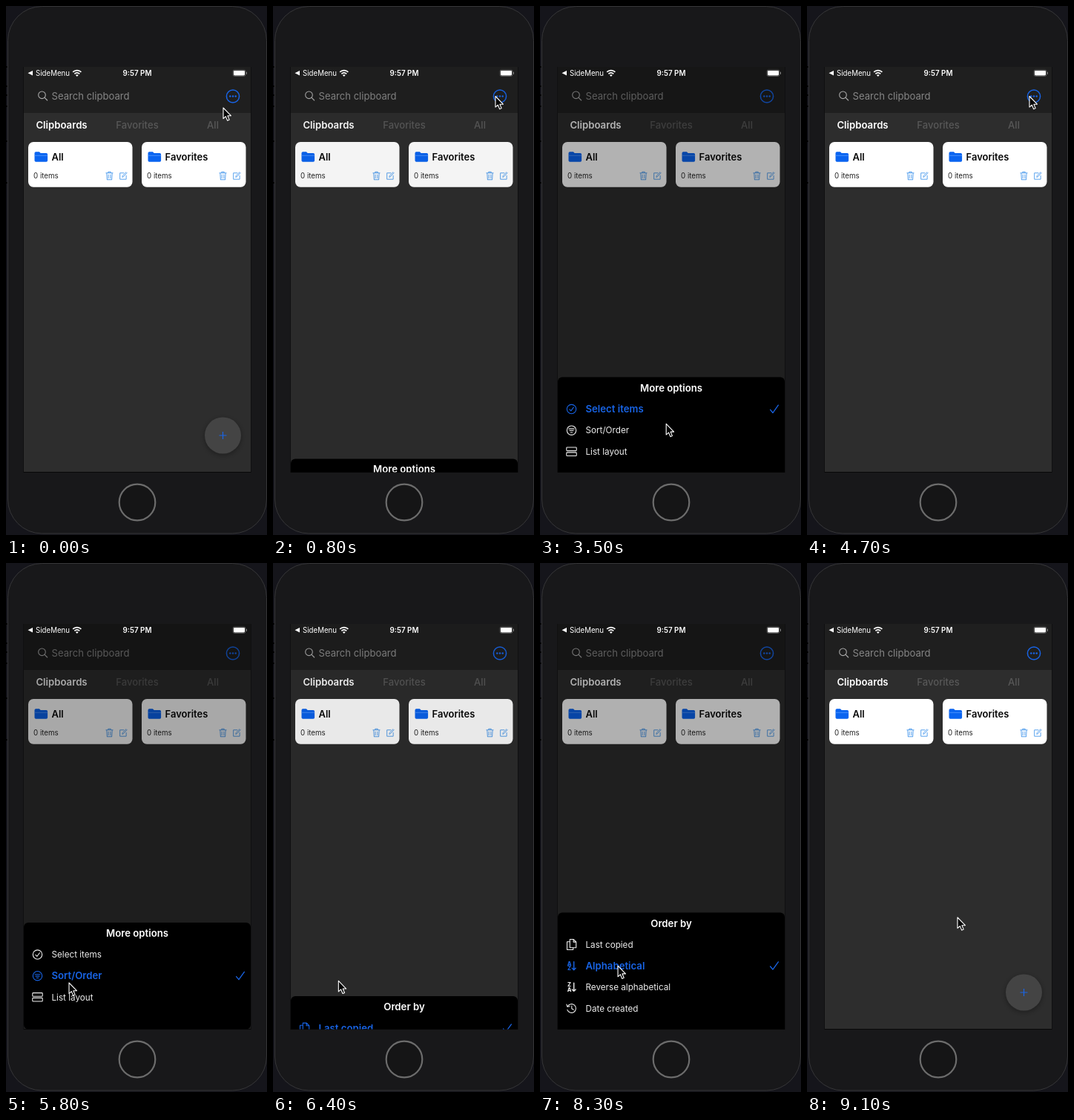
Animation, 352 px wide and 712 px high, one loop 9200 ms. Source, as an HTML page:

```html
<!DOCTYPE html>
<html lang="en">
<head>
<meta charset="utf-8">
<title>Clipboard menu</title>
<style>
html, body { margin: 0; width: 100%; height: 100%; overflow: hidden; background: #15151b; }
svg { display: block; width: 352px; height: 712px; }
text { font-family: Inter, "Open Sans", sans-serif; }
.ico { fill: none; stroke: currentColor; stroke-width: 1.1; stroke-linecap: round; stroke-linejoin: round; }
</style>
</head>
<body>
<svg id="stage" viewBox="0 0 352 712" xmlns="http://www.w3.org/2000/svg"></svg>
<script>
const LOOP = 9200, STEP = 100;
const BLUE = '#1864e6', BOTTOM = 627.5, ROW = 28.6;
const stage = document.getElementById('stage');

const label = (x, y, size, str, { fill = '#fff', weight = 400, anchor = 'start' } = {}) =>
  `<text x="${x}" y="${y + size * 0.36}" font-size="${size}" font-weight="${weight}" fill="${fill}" text-anchor="${anchor}">${str}</text>`;
const at = (x, y, body, color, scale = 1) =>
  `<g class="ico" transform="translate(${x} ${y}) scale(${scale})" color="${color}">${body}</g>`;
const letter = (y, ch) =>
  `<text x="-3" y="${y}" font-size="7.4" font-weight="800" text-anchor="middle" fill="currentColor" stroke="none">${ch}</text>`;
const sorted = (a, b) =>
  letter(-0.6, a) + letter(6.2, b) + '<path d="M3.2-5.5V5.5M.8 3.2 3.2 5.6 5.6 3.2" stroke-width="1.4"/>';

const icons = {
  select: '<circle r="6.2"/><path d="M-2.6.3-.7 2.4 2.8-2.4"/>',
  sort: '<circle r="6.2"/><path d="M-3.5-2H3.5M-2.5.4H2.5M-1.3 2.8H1.3"/>',
  list: '<rect x="-6.7" y="-5.7" width="13.4" height="4.6" rx=".8"/><rect x="-6.7" y="1.1" width="13.4" height="4.6" rx=".8"/>',
  copied: '<path d="M-2.2-3.8H-6V7H2.2V4.3M-2.2 4.3V-7H2.8L6.2-3.6V4.3ZM2.6-6.8V-3.4H6"/>',
  az: sorted('A', 'Z'),
  za: sorted('Z', 'A'),
  date: '<path d="M-5.2-2.6A5.9 5.9 0 1 1-5.6 2M-6.6-5.2-5.6-2-2.3-2.6M.3-3.3V.4L2.7 2"/>',
  check: '<path d="M-5.4.9-2 5 5.4-5.3" stroke-width="1.3"/>',
  trash: '<path d="M-5-4H5M-1.8-4V-5.8H1.8V-4M-4-4-3.4 5.8H3.4L4-4M-1.5-1.7V3.6M1.5-1.7V3.6"/>',
  edit: '<path d="M1-4.4H-4.8V5H4.6V-.4M-1.2 1.5-.8-.4 4.5-5.6 5.6-4.5.6.9Z"/>'
};

const card = (x, name) => `
  <g transform="translate(${x} 183)">
    <rect width="140.5" height="60.8" rx="7" fill="#fff"/>
    <path d="M8.5 25V15q0-1.8 1.8-1.8h4.6l1.8 1.8h7.6q1.8 0 1.8 1.8V25q0 1.8-1.8 1.8h-14Q8.5 26.8 8.5 25Z" fill="#0a64f0"/>
    <path d="M8.5 18.3h17.6" stroke="#5a9cff" stroke-width=".8"/>
    ${label(31.5, 20, 13, name, { fill: '#080808', weight: 600 })}
    ${label(7, 45.6, 9.75, '0 items', { fill: '#222' })}
    ${at(109.5, 45.5, icons.trash, '#5aa2ee', 0.92)}
    ${at(128, 45.7, icons.edit, '#5aa2ee', 0.9)}
  </g>`;

function makeSheet(id, title, items, runs) {
  const height = 60 + 27.8 * items.length;
  const rows = items.map(([icon, name], i) => {
    const y = 43 + ROW * i;
    return `<g class="off">${at(42.5, y, icons[icon], '#eee')}${label(61.5, y, 11.7, name, { fill: '#eee' })}</g>
      <g class="on">${at(42.5, y, icons[icon], BLUE)}${label(61.5, y, 13.2, name, { fill: BLUE, weight: 600 })}
      ${at(316, y, icons.check, BLUE)}</g>`;
  }).join('');
  const svg = `<g id="${id}"><rect x="24" width="306" height="${height}" rx="6" fill="#000"/>
    ${label(177, 14.3, 13.2, title, { weight: 600, anchor: 'middle' })}${rows}</g>`;
  return { id, height, svg, runs };
}

// Each run opens, may be dragged down by the pointer, then closes.
const more = makeSheet('more', 'More options',
  [['select', 'Select items'], ['sort', 'Sort/Order'], ['list', 'List layout']],
  [{ open: 700, grab: 3340, close: 3940 }, { open: 4800, close: 5900 }]);
const order = makeSheet('order', 'Order by',
  [['copied', 'Last copied'], ['az', 'Alphabetical'], ['za', 'Reverse alphabetical'], ['date', 'Date created']],
  [{ open: 6250, grab: 8200, close: 8600 }]);

const phone = `
  <rect width="352" height="712" fill="#15151b"/>
  <path d="M0 82H3M0 108H3M0 120H3M0 135H3M0 182H3M0 238H3" stroke="#050505" stroke-width="2"/>
  <rect x="2.5" y=".5" width="349" height="709.5" rx="46" fill="#18181a" stroke="#363638"/>
  <circle cx="177" cy="668" r="24.3" fill="#151516" stroke="#6c6c6c" stroke-width="2.2"/>
  <rect x="23.5" y="82" width="307" height="546" fill="#080808"/>`;

const home = `
  <rect x="24" y="82" width="306" height="545" fill="#2d2d2d"/>
  <rect x="24" y="82" width="306" height="62" fill="#1f1f1f"/>
  ${at(49.5, 121, '<circle cx="-1" cy="-1.2" r="4.8"/><path d="M2.6 2.4 6.2 6"/>', '#aaa')}
  ${label(61.5, 121.3, 13.1, 'Search clipboard', { fill: '#868686' })}
  <circle cx="306" cy="121.5" r="8.6" fill="none" stroke="${BLUE}" stroke-width="1.5"/>
  ${[-3.7, 0, 3.7].map(d => `<circle cx="${306 + d}" cy="121.5" r="1.25" fill="${BLUE}"/>`).join('')}
  ${label(75, 160.5, 13.2, 'Clipboards', { weight: 600, anchor: 'middle' })}
  ${label(177, 160.5, 13.1, 'Favorites', { fill: '#585858', weight: 500, anchor: 'middle' })}
  ${label(279, 160.5, 13.1, 'All', { fill: '#585858', weight: 500, anchor: 'middle' })}
  ${card(30, 'All')}${card(183, 'Favorites')}
  <g id="add">
    <circle cx="292.5" cy="580" r="26" fill="#000" opacity=".22" filter="url(#soft)"/>
    <circle cx="292.5" cy="578" r="24.5" fill="#444"/>
    <path d="M287.5 578h10M292.5 573v10" stroke="${BLUE}" stroke-width="1.2"/>
  </g>`;

const status = `
  <path d="M29.5 90.3 36 87V93.6Z" fill="#fff"/>
  ${label(40, 90.3, 9.7, 'SideMenu')}
  <path d="M90.2 88.9a8 8 0 0 1 11.2 0M92.4 91.3a4.8 4.8 0 0 1 6.8 0" fill="none" stroke="#fff" stroke-width="1.7"/>
  <path d="M95.8 95 93.9 93.1a2.7 2.7 0 0 1 3.8 0Z" fill="#fff"/>
  ${label(177, 90.3, 9.8, '9:57 PM', { weight: 600, anchor: 'middle' })}
  <rect x="306" y="86" width="17" height="8.4" rx="2.3" fill="none" stroke="#777" stroke-width=".7"/>
  <rect x="307" y="87" width="15" height="6.4" rx="1.3" fill="#fff"/>
  <path d="M324.4 88.8v3" stroke="#888"/>`;

stage.innerHTML = `
  <defs>
    <clipPath id="screen"><rect x="24" y="82" width="306" height="545.5"/></clipPath>
    <filter id="soft" x="-30%" y="-30%" width="160%" height="160%"><feGaussianBlur stdDeviation="2.5"/></filter>
  </defs>
  ${phone}
  <g clip-path="url(#screen)">
    ${home}
    <rect id="dim" x="24" y="82" width="306" height="546"/>
    ${status}${more.svg}${order.svg}
  </g>
  <path id="cursor" d="M0 0V14.6L3.3 11.6 5.7 17.2 8.2 16.1 5.9 10.7H10.4Z" fill="#050505" stroke="#fff" stroke-width="1.1" stroke-linejoin="round"/>`;

const $ = id => document.getElementById(id);
const show = (el, on) => { el.style.display = on ? '' : 'none'; };
const between = (t, a, b) => t >= a && t < b;
const mix = (a, b, k) => a + (b - a) * k;
function ease(p) {
  p = Math.min(1, Math.max(0, p));
  return p * p * (3 - 2 * p);
}

// Pointer moves: from, to (ms), then where it comes to rest.
const MENU = [300, 121.5];
const moves = [
  [0, 500, ...MENU], [900, 1600, 189.5, 532], [2000, 2500, 110, 562], [2500, 3100, 170, 547],
  [3340, 3940, 171, 635], [4050, 4600, ...MENU], [4900, 5600, 85, 565],
  [6300, 6900, 130, 529], [6900, 7400, 104.5, 528], [8200, 8600, 108, 619], [8700, 9100, 203, 477]
];
const pointer = t => moves.reduce(([x, y], [from, to, nx, ny]) => {
  const k = ease((t - from) / (to - from));
  return [mix(x, nx, k), mix(y, ny, k)];
}, [293, 137]);

function dropOf({ height, runs }, t) {
  const run = runs.find(r => between(t, r.open, r.close + 250));
  if (!run) return height;
  const { open, grab, close } = run;
  const drop = t >= grab
    ? pointer(Math.min(t, close))[1] - pointer(grab)[1]
    : height * (1 - ease((t - open) / 450));
  return mix(drop, height, ease((t - close) / 250));
}

// Positions a sheet and returns how far it is open, 0 to 1.
function place(sheet, t, picked) {
  const el = $(sheet.id), drop = dropOf(sheet, t);
  el.setAttribute('transform', `translate(0 ${BOTTOM - sheet.height + drop})`);
  show(el, drop < sheet.height);
  el.querySelectorAll('.on').forEach((g, i) => show(g, i === picked));
  el.querySelectorAll('.off').forEach((g, i) => show(g, i !== picked));
  return 1 - drop / sheet.height;
}

function draw(t) {
  const open = Math.max(place(more, t, t < 5800 ? 0 : 1), place(order, t, t < 7500 ? 0 : 1));
  $('dim').setAttribute('opacity', 0.34 * open);
  show($('add'), t < 700 || between(t, 4200, 4600) || t >= 8900);
  $('cursor').setAttribute('transform', `translate(${pointer(t).join(' ')})`);
}

const start = performance.now();
function tick() {
  const t = (performance.now() - start) % LOOP;
  draw(Math.floor(t / STEP) * STEP);
  requestAnimationFrame(tick);
}
tick();
</script>
</body>
</html>
```
